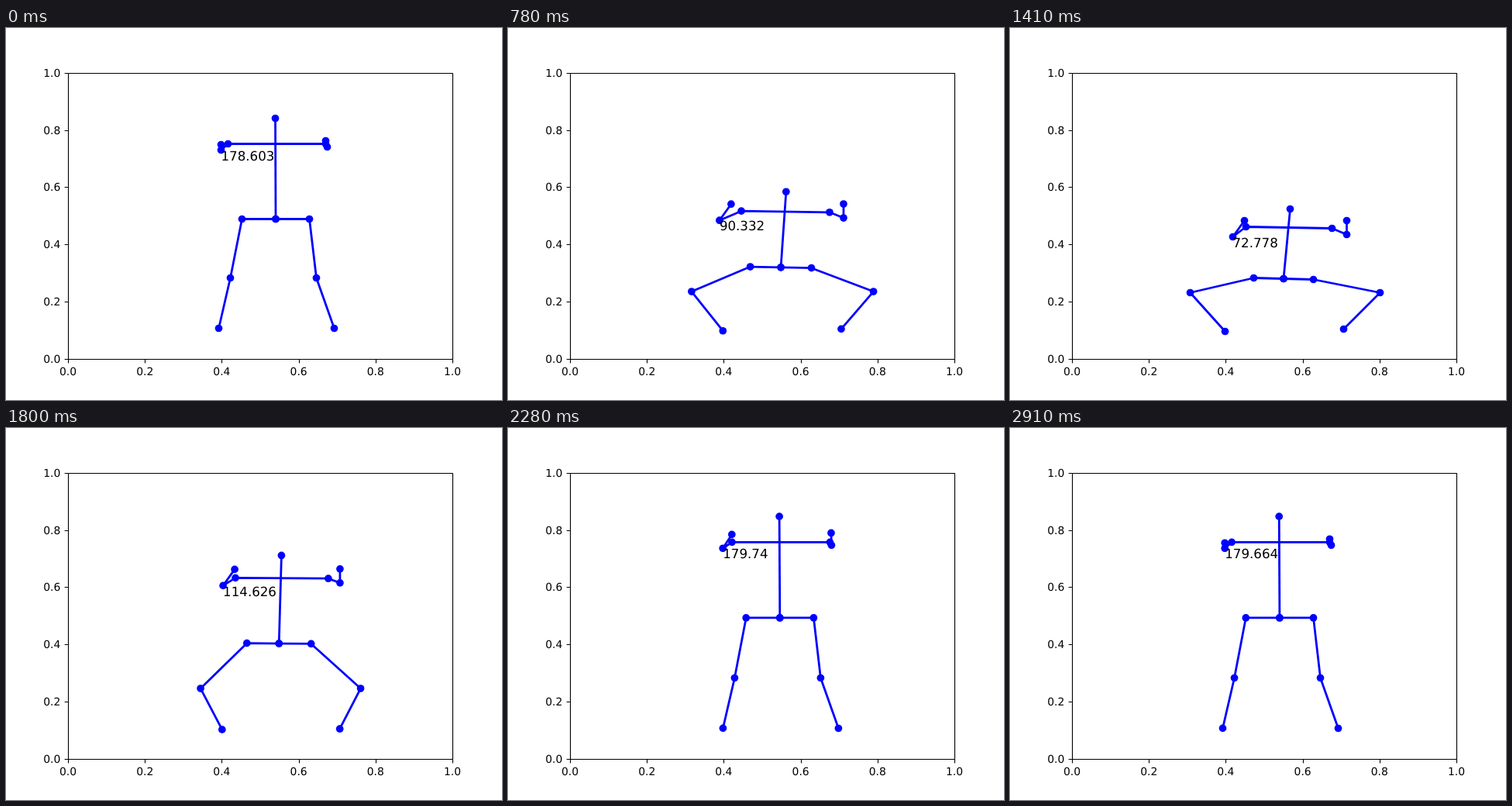
An HTML page with a canvas that plays this animation: 640 px wide and 480 px high, repeating every 2.94 s.

```html
<!DOCTYPE html>
<html lang="en">
<head>
<meta charset="utf-8">
<title>Squat angle</title>
<style>
html, body { margin: 0; width: 100%; height: 100%; overflow: hidden; background: #fff; }
canvas { display: block; }
</style>
</head>
<body>
<canvas id="stage" width="640" height="480"></canvas>
<script>
const ctx = document.getElementById('stage').getContext('2d');
const LOOP = 2940, STEP = 30;

// Time, squat depth (0 standing, 1 deep), knee angle shown
const keys = [[0, 0, 178.603], [120, 0, 178.603], [450, 0.39, 121.801], [780, 0.81, 90.332],
  [1200, 1.06, 66.634], [1410, 1, 72.778], [1800, 0.41, 114.626],
  [2130, -0.02, 179.74], [2280, -0.02, 179.74], [2910, -0.02, 179.664]];

const secant = (k, c) => (keys[k + 1][c] - keys[k][c]) / (keys[k + 1][0] - keys[k][0]);

// Slope at a key that never overshoots: harmonic mean, or zero at a turn
function slope(k, c) {
  if (k === 0 || k === keys.length - 1) return 0;
  const a = secant(k - 1, c), b = secant(k, c);
  return a * b > 0 ? 2 * a * b / (a + b) : 0;
}

function valueAt(t, c) {
  let k = 0;
  while (k < keys.length - 2 && t >= keys[k + 1][0]) k++;
  const from = keys[k], to = keys[k + 1];
  const span = to[0] - from[0], s = (t - from[0]) / span, r = 1 - s;
  return from[c] * r * r * (1 + 2 * s) + to[c] * s * s * (3 - 2 * s) +
    span * (slope(k, c) * s * r * r - slope(k + 1, c) * s * s * r);
}

function ramp(t, start, end) {
  const s = Math.min(1, Math.max(0, (t - start) / (end - start)));
  return s * s * (3 - 2 * s);
}

function bodyAt(t) {
  const depth = valueAt(t, 1);
  const bend = Math.max(0, depth) ** 0.38; // knees open early, then slow down
  const raise = ramp(t, 100, 420) - ramp(t, 2050, 2800);
  const sway = 3 * Math.max(0, Math.sin(Math.PI * (t - 1410) / 1500));
  const move = (x, y, dx, dy, kx = depth, ky = kx) => [x + dx * kx + sway, y + dy * ky];
  const add = ([x, y], dx, dy) => [x + dx, y + dy];

  // The left elbow drifts out on the way down and is tucked in on the way up
  const tuck = 15 * depth * ramp(t, 1000, 1410);
  const elbowL = [277 - 5 * bend + tuck, 157 + 112 * depth];
  const elbowR = move(414, 153, 20, 113, bend, depth);
  const hipL = move(304, 246, 10, 76), hipR = move(391, 246, 0, 78);
  const pelvis = [(hipL[0] + hipR[0]) / 2, (hipL[1] + hipR[1]) / 2];
  return {
    elbowL,
    chains: [
      [move(347, 116, 14, 117), pelvis],
      [add(elbowL, 15 * raise, -7 - 14 * raise), elbowL, move(286, 149, 18, 107),
        move(412, 149, 3, 109), elbowR, add(elbowR, 2 * raise - 2, -8 - 10 * raise)],
      [move(274, 387, 3, 4, bend, depth), move(289, 322, -57, 19, bend), hipL, pelvis,
        hipR, move(400, 322, 77, 19, bend), move(423, 387, 7, 1, bend)]
    ]
  };
}

function drawAxes() {
  ctx.strokeStyle = ctx.fillStyle = '#000';
  ctx.lineWidth = 1.11;
  ctx.strokeRect(80.5, 58.5, 496, 369);
  ctx.font = '13.89px "DejaVu Sans", sans-serif';
  ctx.beginPath();
  for (let i = 0; i <= 5; i++) {
    const label = (i / 5).toFixed(1);
    const x = 80 + 99.2 * i, y = 427.2 - 73.92 * i;
    const px = Math.round(x) + 0.5, py = Math.round(y) + 0.5;
    ctx.moveTo(px, 428);
    ctx.lineTo(px, 432.4);
    ctx.moveTo(80, py);
    ctx.lineTo(75.6, py);
    ctx.textAlign = 'center';
    ctx.fillText(label, x, 448);
    ctx.textAlign = 'right';
    ctx.fillText(label, 70.3, Math.round(y + 5));
  }
  ctx.stroke();
}

function drawChain(points) {
  ctx.beginPath();
  points.forEach(([x, y]) => ctx.lineTo(x, y));
  ctx.stroke();
  for (const [x, y] of points) {
    ctx.beginPath();
    ctx.arc(x, y, 4.86, 0, 7);
    ctx.fill();
  }
}

function drawBody(t) {
  const { elbowL: [x, y], chains } = bodyAt(t);
  ctx.strokeStyle = ctx.fillStyle = '#00f';
  ctx.lineWidth = 2.78;
  ctx.lineJoin = 'round';
  ctx.save();
  ctx.translate(0.5, 0.5);
  chains.forEach(drawChain);
  ctx.restore();

  ctx.fillStyle = '#000';
  ctx.font = '16.67px "DejaVu Sans", sans-serif';
  ctx.textAlign = 'left';
  ctx.fillText(String(+valueAt(t, 2).toFixed(3)), x + 0.5, Math.round(y + 13.6));
}

function draw(now) {
  const t = Math.floor(now % LOOP / STEP) * STEP;
  ctx.textRendering = 'geometricPrecision';
  ctx.fillStyle = '#fff';
  ctx.fillRect(0, 0, 640, 480);
  drawAxes();
  drawBody(t);
  requestAnimationFrame(draw);
}
draw(0);
</script>
</body>
</html>
```
